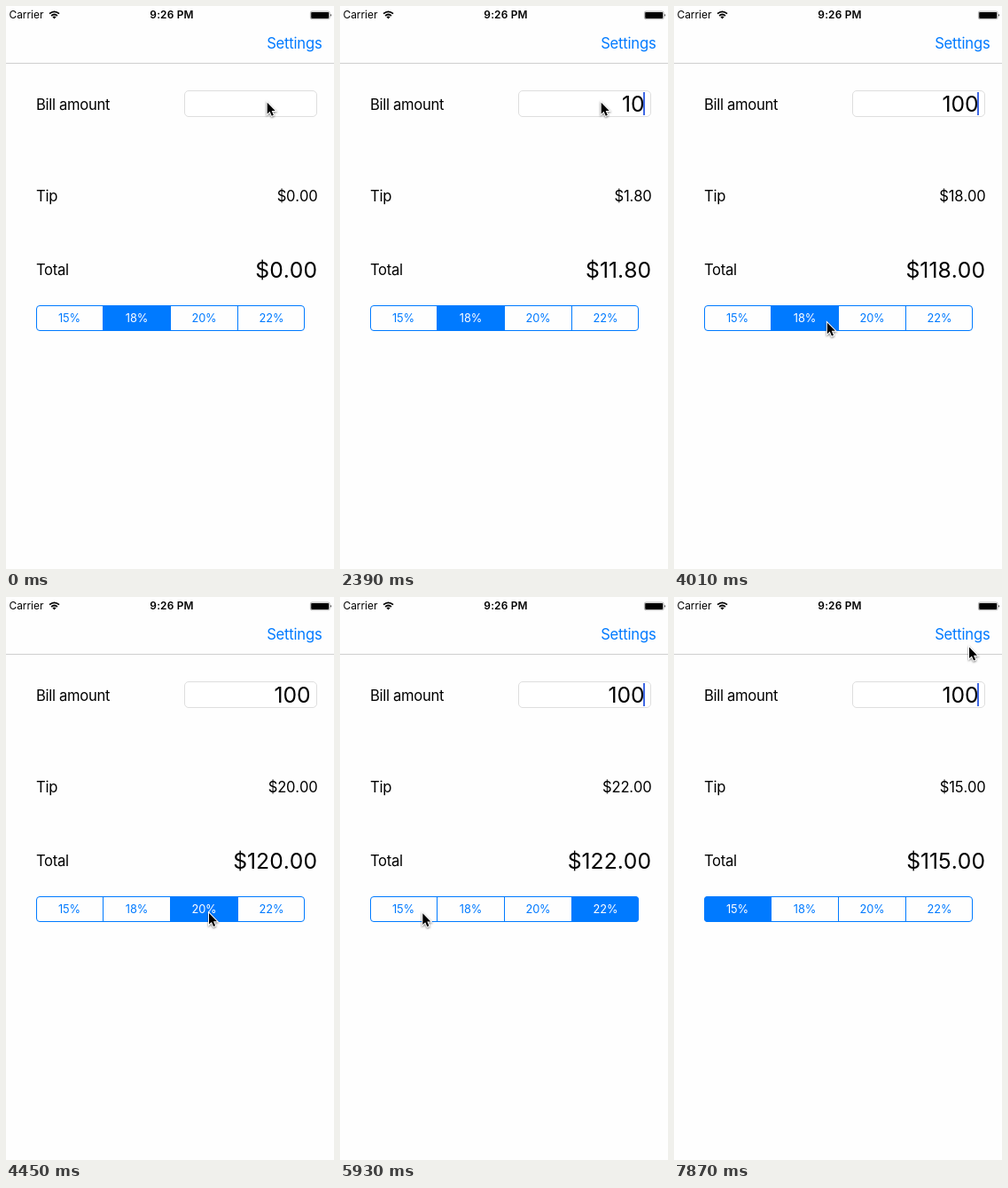
An HTML page that plays this animation: 370x634 px, repeating every 8000 ms.

```html
<!DOCTYPE html>
<html lang="en">
<head>
<meta charset="utf-8">
<title>Tip calculator</title>
<style>
  html, body { margin: 0; height: 100%; overflow: hidden; background: #fefefe; }
  svg { display: block; width: 100vw; height: 100vh; }
  text { font: 16.6px Inter, Roboto, sans-serif; letter-spacing: -.018em; }
  .end { text-anchor: end; font-kerning: none; letter-spacing: -.012em; }
  .mid { text-anchor: middle; }
  .big { font-size: 24.7px; letter-spacing: 0; }
  .status { font-size: 11.9px; letter-spacing: 0; }
  .clock { font-weight: 600; letter-spacing: .015em; }
  .seg { font-size: 12.8px; letter-spacing: -.01em; }
  .blue { fill: #007aff; }
</style>
</head>
<body>
<svg viewBox="0 0 370 634">
  <text class="status" x="3.5" y="14.3">Carrier</text>
  <g fill="none" stroke="#000" stroke-width="1.7">
    <path d="M49 8.7Q54.5 3.9 60 8.7M51.1 11Q54.5 8 57.9 11"/>
    <path d="M52.4 12.3Q54.5 10.7 56.6 12.3L54.5 14.5Z" fill="#000" stroke="none"/>
  </g>
  <text class="status clock mid" x="187" y="14.3">9:26 PM</text>
  <rect x="343.4" y="6.1" width="21.6" height="8.6" rx="1.6" fill="#fff" stroke="#777" stroke-width=".6"/>
  <rect x="344.2" y="6.9" width="20" height="7" rx=".8"/>
  <path d="M366 8.8Q367.8 10.4 366 12Z"/>

  <text class="blue end" x="356.5" y="48.2">Settings</text>
  <path d="M0 64.5H370" stroke="#cfcfcf"/>

  <text x="34" y="116.5">Bill amount</text>
  <text x="34" y="219.5">Tip</text>
  <text x="34" y="302.5">Total</text>

  <rect x="201.5" y="95.5" width="149" height="29" rx="4.5" fill="#fff" stroke="#dedede"/>
  <text id="bill" class="end big" x="343.6" y="119"></text>
  <rect id="caret" x="342" y="97" width="2" height="26" fill="#3f68e4"/>
  <text id="tip" class="end" x="351.5" y="219.5"></text>
  <text id="total" class="end big" x="351" y="305.8"></text>

  <clipPath id="round"><rect x="34" y="337" width="303" height="29" rx="4"/></clipPath>
  <rect id="pick" y="337" width="77" height="29" class="blue" clip-path="url(#round)"/>
  <path d="M109.5 338V365M185.5 338V365M261.5 338V365" stroke="#007aff"/>
  <rect x="34.5" y="337.5" width="302" height="28" rx="3.5" fill="none" stroke="#007aff"/>
  <g id="segs"></g>

  <g id="cursor">
    <path id="arrow" d="M0 0V12.6L2.9 9.9L5.1 14.9L7.1 14L5 9.2H9Z" stroke="#fff" stroke-width="2"
          paint-order="stroke" style="filter: drop-shadow(0 1px 1px #0008)"/>
  </g>
</svg>
<script>
const LOOP = 8000, MOVE = 3140, TICK = 147.8;
const $ = id => document.getElementById(id);
const rates = [15, 18, 20, 22];

$('segs').innerHTML = rates.map((r, i) =>
  `<text class="seg mid" x="${71.5 + 76 * i}" y="356.2">${r}%</text>`).join('');
const labels = [...$('segs').children];

const focus = 750, keys = [1490, 2390, 2690];

// Pointer moves, in ticks; a move with a pick ends in a press
const home = { x: 294.7, y: 108.8 };
const moves = [
  { from: -1, to: 4, x: 145, y: 357, pick: 1 },
  { from: 5, to: 9, x: 229, y: 356, pick: 2 },
  { from: 10, to: 13, x: 275, y: 351, pick: 3 },
  { from: 15, to: 20, x: 72, y: 357, pick: 0 },
  { from: 22, to: 24, x: 240.7, y: 172.5 },
  { from: 24, to: 32, x: 333, y: 56.5 }
];

const clamp = v => Math.max(0, Math.min(1, v));
const ease = u => 1 - (1 - u) ** 1.4;

function pointer(tick) {
  let { x, y } = home;
  for (const m of moves) {
    const u = ease(clamp((tick - m.from) / (m.to - m.from)));
    x += (m.x - x) * u;
    y += (m.y - y) * u;
  }
  return [x, y];
}

function picked(tick) {
  const done = moves.filter(m => 'pick' in m && m.to <= tick);
  return done.length ? done.at(-1).pick : 1;
}

// Blinks once a second, starting afresh at each key press
function caret(t) {
  if (t < focus) return 0;
  const p = (t - [focus, ...keys].filter(k => k <= t).pop()) % 1000;
  return p < 600 ? clamp((545 - p) / 125) : clamp((p - 830) / 100);
}

function draw(t) {
  // Once the pointer moves, the picture advances in ticks
  const tick = t < MOVE ? -1 : Math.floor((t - MOVE + 25) / 147.5);
  const bill = +'100'.slice(0, keys.filter(k => k <= t).length);
  const seg = picked(tick), tip = bill * rates[seg] / 100;

  $('bill').textContent = bill || '';
  $('tip').textContent = '$' + tip.toFixed(2);
  $('total').textContent = '$' + (bill + tip).toFixed(2);
  $('caret').setAttribute('opacity', caret(tick < 0 ? t : MOVE + tick * TICK));
  $('pick').setAttribute('x', 33 + 76 * seg);
  labels.forEach((l, i) => l.setAttribute('fill', i === seg ? '#fff' : '#007aff'));
  $('cursor').setAttribute('transform', `translate(${pointer(tick)})`);
}

const start = performance.now();
function frame() {
  draw((performance.now() - start) % LOOP);
  requestAnimationFrame(frame);
}
frame();
</script>
</body>
</html>
```
